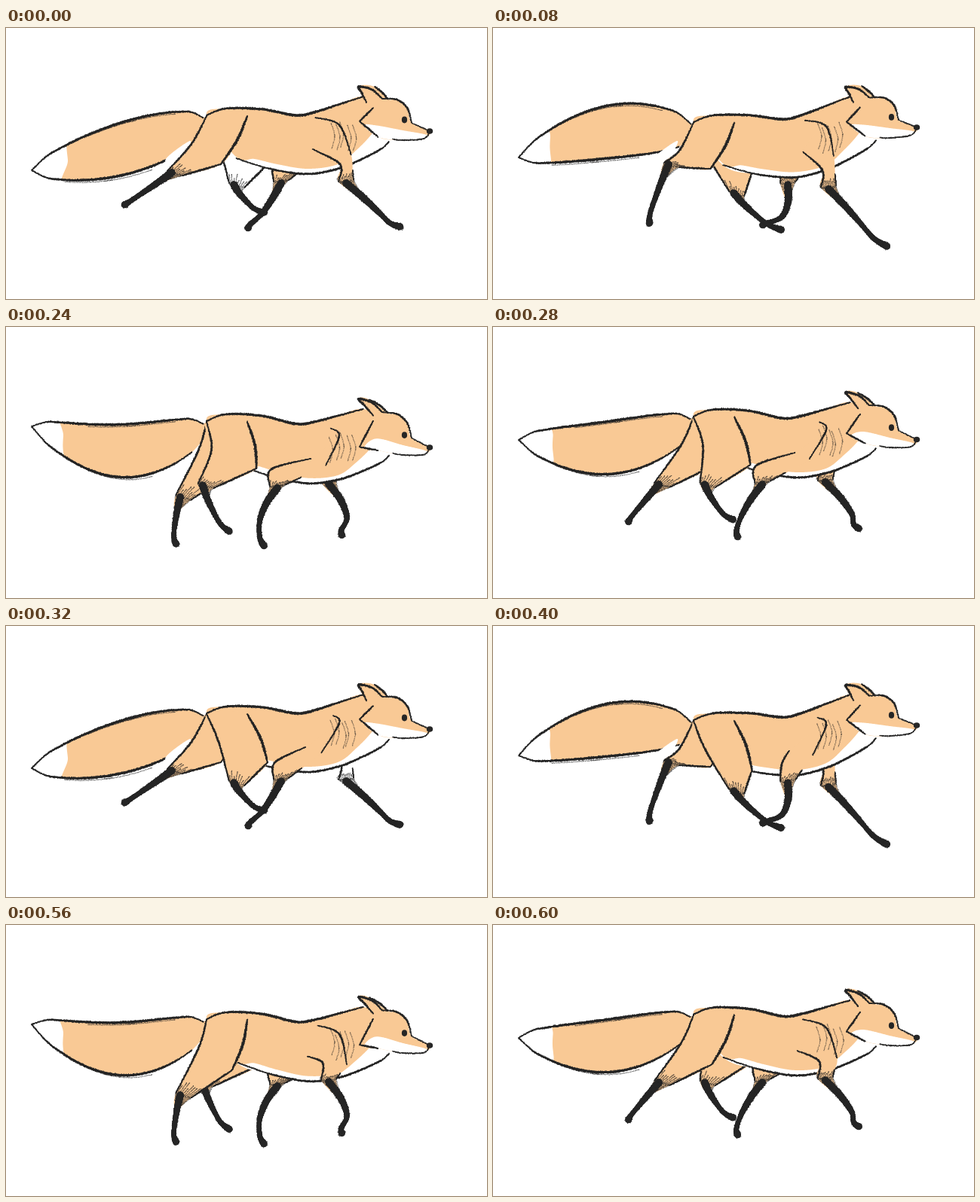
Write an HTML page with a canvas that moves like this. It is 638 px wide and 360 px high and loops after 0.64 s.

```html
<!DOCTYPE html>
<html lang="en">
<head>
<meta charset="utf-8">
<title>Trotting fox</title>
<style>
html, body { margin: 0; width: 100%; height: 100%; overflow: hidden; background: #fff; }
canvas { display: block; }
</style>
</head>
<body>
<canvas id="stage" width="638" height="360"></canvas>
<script>
const ctx = document.getElementById('stage').getContext('2d');
const FUR = '#f9c995', INK = '#262626', WHITE = '#fff';
const STEP = 40, STEPS = 16;

const mix = (a, b, s) => [a[0] + (b[0] - a[0]) * s, a[1] + (b[1] - a[1]) * s];
const move = ([x, y], dx, dy) => [x + dx, y + dy];

let seed = 1;
function rnd() {
  seed = (seed * 1664525 + 1013904223) >>> 0;
  return seed / 4294967296;
}

// Sum of harmonics: mean, then cosine and sine weights of each order.
function wave(phase, mean, ...weights) {
  return weights.reduce((sum, w, i) => {
    const angle = phase * (Math.floor(i / 2) + 1);
    return sum + w * (i % 2 ? Math.sin(angle) : Math.cos(angle));
  }, mean);
}

// The body bobs twice per stride, and the bob reaches the head late.
let beat = 0;
function ride([x, y]) {
  const lag = Math.max(0, x - 320) / 242;
  return [x, y - 9 * Math.cos(beat) - 14 * lag * Math.sin(beat)];
}

// Catmull-Rom samples: [x, y, position from 0 to 1]
function curve(p, closed = false) {
  const n = p.length, count = closed ? n : n - 1, out = [];
  const at = j => closed ? p[(j + n) % n] : p[Math.max(0, Math.min(n - 1, j))];
  for (let i = 0; i < count; i++) {
    const [a, b, c, d] = [at(i - 1), at(i), at(i + 1), at(i + 2)];
    const steps = Math.ceil(Math.hypot(c[0] - b[0], c[1] - b[1]) / 0.8) + 1;
    for (let k = 0; k < steps; k++) {
      const u = k / steps;
      const f = q => b[q] + u / 2 * (c[q] - a[q] + u * (2 * a[q] - 5 * b[q] + 4 * c[q] - d[q]
        + u * (3 * (b[q] - c[q]) + d[q] - a[q])));
      out.push([f(0), f(1), (i + u) / count]);
    }
  }
  return out;
}

function trace(points) {
  ctx.beginPath();
  for (const [x, y] of curve(points, true)) ctx.lineTo(x, y);
  ctx.closePath();
}

function fill(points, color) {
  trace(points);
  ctx.fillStyle = color;
  ctx.fill();
}

function dot([x, y], rx, ry) {
  ctx.fillStyle = INK;
  ctx.beginPath();
  ctx.ellipse(x, y, rx, ry, 0, 0, 7);
  ctx.fill();
}

// Grainy charcoal mark whose width runs through the given list.
function brush(points, widths, core = 0.7) {
  ctx.fillStyle = INK;
  for (const [x, y, u] of curve(points)) {
    const s = u * (widths.length - 1), i = Math.floor(s);
    const r = (widths[i] + (widths[i + 1] - widths[i]) * (s - i)) / 2;
    ctx.beginPath();
    ctx.arc(x, y, r * core, 0, 7);
    ctx.fill();
    for (let k = 0; k < r * 1.6; k++) {
      const a = rnd() * 6.283, d = r * Math.sqrt(rnd());
      ctx.fillRect(x + Math.cos(a) * d - 0.5, y + Math.sin(a) * d - 0.5, 1, 1);
    }
  }
}

const line = (points, w = 3.6) => brush(points, [w * 0.5, w, w * 1.1, w, w * 0.5]);

function faint(points, alpha) {
  ctx.globalAlpha = alpha;
  brush(points, [0.8, 1.3, 0.8], 0.3);
  ctx.globalAlpha = 1;
}

// Pencil shading from the fur edge low1-low2 down into the dark stocking.
function stocking(leg, low1, low2, high1, high2) {
  for (let i = 0; i <= 9; i++) {
    const s = i / 9, p = mix(low1, low2, s);
    faint([mix(p, mix(high1, high2, s), 0.15 + 0.2 * rnd()), p, mix(p, leg[1], 0.7)], 0.6);
  }
  brush(leg, [11, 11, 9, 7, 8, 11], 0.85);
}

function hindLeg(p, near) {
  const rump = ride([266, 126]), hip = ride([320, 126]);
  const knee = ride([wave(p, 316, -31, -8), wave(p, 190, 0, -4)]);
  const hock = ride([wave(p, 255, -41, -20, 0, 15), wave(p, 207, -8, -19, 0, -9)]);
  const toe = [wave(p, 271, -90, -36, -14, 17, -3, -1, -7), wave(p, 266, -1, -8, -20, -8, -4, -1, -6)];
  const back = ride([wave(p, 264, -18, -6), 163]);
  const front = move(mix(hip, knee, 0.5), 4, 0);
  const shin = move(hock, 20, 6);
  const ankle = move(mix(hock, toe, 0.75), -3, 4);
  const leg = [move(hock, 6, 2), mix(move(hock, 4, 4), ankle, 0.35), ankle, toe];

  fill([rump, back, hock, leg[1], shin, knee, front, hip], near || Math.cos(p) > -0.95 ? FUR : WHITE);
  line([rump, back, hock], 2.8);
  line([hip, front, knee], near ? 3.8 : 2.4);
  line([knee, mix(knee, shin, 0.5), shin], 2.8);
  stocking(leg, hock, shin, back, knee);
}

function foreLeg(p, near) {
  const top = [wave(p, 406, 43, -5, 2, 12), wave(p, 209, 0, 4, -5)];
  const wrist = [wave(p, 415, 72, -12, 3, 19), wave(p, 247, 0, 0, -6.5)];
  const toe = [wave(p, 415, 98, 17, 9, 23, 3, 5, -2), wave(p, 277, 2, 14, -9, -4, -3, 1, -3)];
  const crest = ride([wave(p, 422, -12), 128]);
  const point = ride([442, 138]);
  const breast = ride([wave(p, 438, 20), 178]);
  const blade = ride([wave(p, 402, 5, 8), 170]);
  const elbow = move(top, -8, -23);
  const inner = move(top, -10, 0), outer = move(top, 10, -2);
  const ankle = move(mix(wrist, toe, 0.7), -4, 2);
  const leg = [move(top, 0, 2), mix(top, wrist, 0.6), mix(wrist, ankle, 0.3), ankle, toe];

  fill([point, breast, outer, leg[1], inner, elbow, blade], near || Math.cos(p) < 0.95 ? FUR : WHITE);
  if (near) line([crest, point, breast], 2.4);
  line([mix(breast, outer, 0.6), outer], 2.2);
  line([blade, elbow, inner], 2.8);
  stocking(leg, inner, outer, elbow, breast);
}

function drawTail() {
  const root = ride([266, 137]);
  const tip = [34, wave(beat, 157, 27, 20, 5, 12)];
  const sag = wave(beat, 7, -4, -23);
  const side = sign => Array.from({ length: 13 }, (_, i) => {
    const s = i / 12;
    const plump = 32 * Math.sin(Math.PI * s ** 0.9) ** 0.6 + 6 * (1 - s);
    return move(mix(root, tip, s), 0, sag * Math.sin(Math.PI * s) + sign * plump);
  });
  const upper = side(-1), lower = side(1);
  const outline = [...upper, ...lower.slice(0, -1).reverse()];
  const edge = 76 + 5 * Math.cos(beat);

  fill(outline, WHITE);
  ctx.save();
  trace(outline);
  ctx.clip();
  fill([[edge + 8, 80], [edge, 145], [edge + 1, 175], [edge + 9, 230], [300, 260], [300, 50]], FUR);
  ctx.restore();
  line(upper);
  line(lower.slice(1));
  faint(upper.slice(2, 9).map(p => move(p, -3, 3)), 0.5);
  faint(lower.slice(4, 11).map(p => move(p, 5, 3)), 0.5);
}

function drawHead() {
  const fold = Math.max(0, -Math.sin(beat));
  const [base, tip, front, far, forehead, brow, stop, nose, chin, jaw, low, top] = [
    [478 + 9 * fold, 108], [468, 87], [499, 103], [489 - 7 * fold, 87], [518, 104], [532, 115],
    [538, 135], [562, 146], [554, 156], [525, 158], [494, 154], [487, 115]
  ].map(ride);
  const cheek = ride(ride([469, 142]));
  const crown = mix(front, forehead, 0.4);

  fill([base, tip, far, crown, forehead, brow, stop, nose, chin, jaw, low, cheek, top], FUR);
  fill([mix(cheek, low, 0.25), mix(top, low, 0.6), mix(brow, jaw, 0.7), mix(nose, chin, 0.5), chin, jaw, low], WHITE);
  line([base, mix(base, tip, 0.6), tip, move(mix(tip, front, 0.5), 2, -4), front], 3.4);
  line([far, move(mix(far, front, 0.6), 4, -2), crown], 3);
  line([front, forehead, brow, stop], 2.6);
  line([stop, mix(stop, nose, 0.5), nose], 1.6);
  line([nose, chin, jaw, mix(jaw, low, 0.4)], 1.8);
  line([top, mix(top, cheek, 0.5), cheek], 2.6);
  line([cheek, mix(cheek, low, 0.5), low], 2.6);
  dot(move(stop, -9.5, -4), 3.6, 4.4);
  dot(nose, 4.2, 3.8);
}

function drawTorso() {
  const back = [[266, 125], [292, 116], [340, 117], [385, 125], [412, 120], [440, 111], [474, 100]].map(ride);
  const under = [[508, 160], [497, 170], [468, 185], [440, 196], [400, 203], [350, 196], [305, 182]].map(ride);
  const hem = [[505, 115], [488, 146], [465, 171], [440, 190], [400, 196], [360, 190], [330, 183], [305, 180]].map(ride);
  fill([...back, ...under], WHITE);
  fill([...back, ...hem], FUR);
  line(under, 3);
  return back;
}

function drawRuff() {
  for (let i = 0; i < 5; i++) {
    const x = 428 + 7 * i + 4 * rnd(), y = 132 + 8 * rnd();
    faint([[x, y], [x + 5, y + 17], [x + 1, y + 34]].map(ride), 0.4);
  }
}

function draw(step) {
  const phase = step / STEPS * 2 * Math.PI;
  beat = 2 * phase;
  seed = 977 * (step + 1);
  ctx.fillStyle = WHITE;
  ctx.fillRect(0, 0, 638, 360);

  drawTail();
  if (Math.cos(beat - 0.8) > 0.6) fill([[244, 150], [212, 174], [222, 186], [237, 168]], WHITE);
  foreLeg(phase + Math.PI, false);
  hindLeg(phase + Math.PI, false);
  const back = drawTorso();
  hindLeg(phase, true);
  foreLeg(phase, true);
  drawRuff();
  line(back);
  drawHead();
}

const start = performance.now();
let shown = -1;
function tick() {
  const step = Math.floor((performance.now() - start) / STEP) % STEPS;
  if (step !== shown) draw(shown = step);
  requestAnimationFrame(tick);
}
tick();
</script>
</body>
</html>
```
